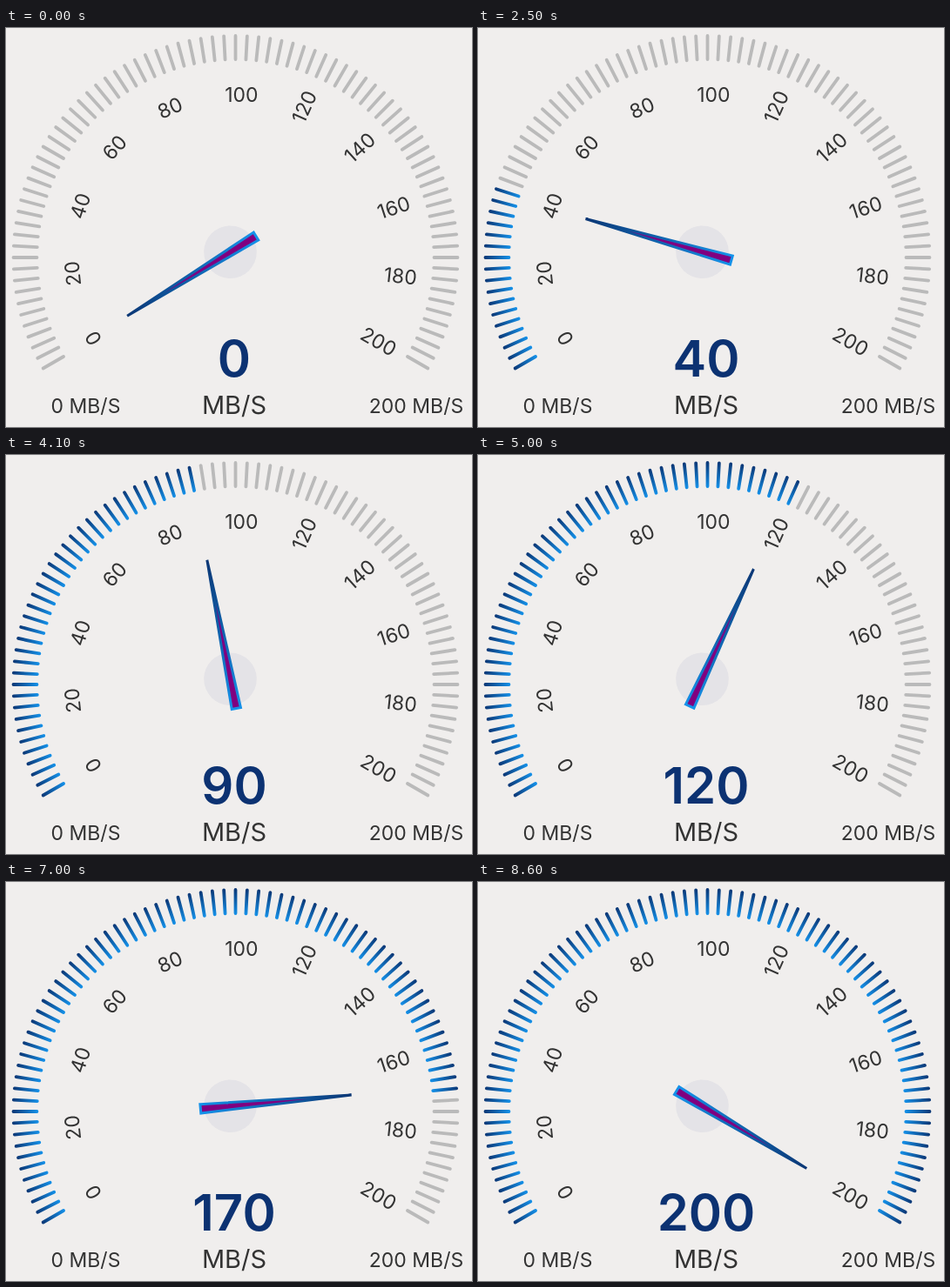
Animation of 535 by 459 pixels, one loop 8700 ms. Source, as an HTML page:

```html
<!DOCTYPE html>
<html lang="en">
<head>
<meta charset="utf-8">
<title>Speed gauge</title>
<style>
  html, body { margin: 0; width: 100%; height: 100%; overflow: hidden; background: #f0eeed; }
  svg { display: block; width: 535px; height: 459px; }
  text { font-family: Inter, Roboto, sans-serif; font-size: 23px; fill: #333; text-anchor: middle; }
  #value { font-size: 58px; font-weight: 600; fill: #0c3272; }
  #unit { font-size: 29px; }
  #ticks line { stroke: #bababa; stroke-width: 3.8; stroke-linecap: round; }
  #ticks line.on { stroke: url(#tickBlue); }
</style>
</head>
<body>
<svg viewBox="0 0 535 459">
  <defs>
    <linearGradient id="tickBlue" gradientUnits="userSpaceOnUse" x1="226" y1="0" x2="257" y2="0">
      <stop offset="0" stop-color="#1592ea"/>
      <stop offset="1" stop-color="#0b3674"/>
    </linearGradient>
    <linearGradient id="needleBlue" gradientUnits="userSpaceOnUse" x1="-36" y1="0" x2="140" y2="0">
      <stop offset="0" stop-color="#1592ea"/>
      <stop offset="1" stop-color="#0b3674"/>
    </linearGradient>
  </defs>
  <g id="ticks"></g>
  <g id="labels"></g>
  <circle cx="257.5" cy="257.7" r="30.3" fill="#e4e3e7"/>
  <path id="needle" d="M-34.5 -5.2 L139.5 0 L-34.5 5.2 Z" fill="#800080" stroke="url(#needleBlue)" stroke-width="3"/>
  <text id="value" x="262" y="401">0</text>
  <text id="unit" x="262" y="444">MB/S</text>
  <text x="91.5" y="443">0 MB/S</text>
  <text x="471" y="443">200 MB/S</text>
</svg>
<script>
  const LOOP = 8700, MAX = 200, STEP = 10, CX = 263.5, CY = 264;
  // Moments at which the reading rises by one step
  const RISES = [1500, 1800, 2100, 2500, 2800, 3000, 3300, 3600, 3900, 4200,
                 4500, 4800, 5200, 5400, 5700, 5900, 6200, 7400, 7600, 7900];
  // Needle direction in degrees by reading
  const DIAL = [[0, -211.8], [50, -151], [70, -125.1], [120, -65.1], [170, -5.2], [200, 31]];

  const $ = id => document.getElementById(id);
  const add = (parent, name, attrs) => {
    const el = document.createElementNS("http://www.w3.org/2000/svg", name);
    for (const key in attrs) el.setAttribute(key, attrs[key]);
    return parent.appendChild(el);
  };

  const ticks = Array.from({ length: 81 }, (_, i) => add($("ticks"), "line", {
    x1: 228, x2: 255, transform: `translate(${CX} ${CY}) rotate(${i * 3 - 210})`
  }));

  for (let v = 0; v <= MAX; v += 20) {
    const angle = v * 1.2 - 210;
    const place = (angle + (v === 100 ? 2.1 : 0.4)) * Math.PI / 180;
    const r = v > 100 ? 190.5 : 188;
    const x = CX + r * Math.cos(place), y = CY + r * Math.sin(place);
    const turn = v > 100 ? angle : angle + 90;
    add($("labels"), "text", { y: 8.4, transform: `translate(${x} ${y}) rotate(${turn})` }).textContent = v;
  }

  function needleAngle(v) {
    const i = Math.max(1, DIAL.findIndex(p => p[0] >= v));
    const [v0, a0] = DIAL[i - 1], [v1, a1] = DIAL[i];
    return a0 + (a1 - a0) * (v - v0) / (v1 - v0);
  }

  function draw(t) {
    const count = RISES.filter(rise => rise <= t).length;
    const reading = count * STEP;
    // The needle lands just short of each reading, then settles
    const lag = count ? 0.8 * Math.max(0, 1 - (t - RISES[count - 1]) / 100) : 0;
    $("value").textContent = reading;
    ticks.forEach((tick, i) => tick.classList.toggle("on", reading > 0 && i * 2.5 <= reading));
    $("needle").setAttribute("transform", `translate(257.7 257.7) rotate(${needleAngle(reading - lag)})`);
  }

  const start = performance.now();
  function loop() {
    draw((performance.now() - start) % LOOP);
    requestAnimationFrame(loop);
  }
  loop();
</script>
</body>
</html>
```
